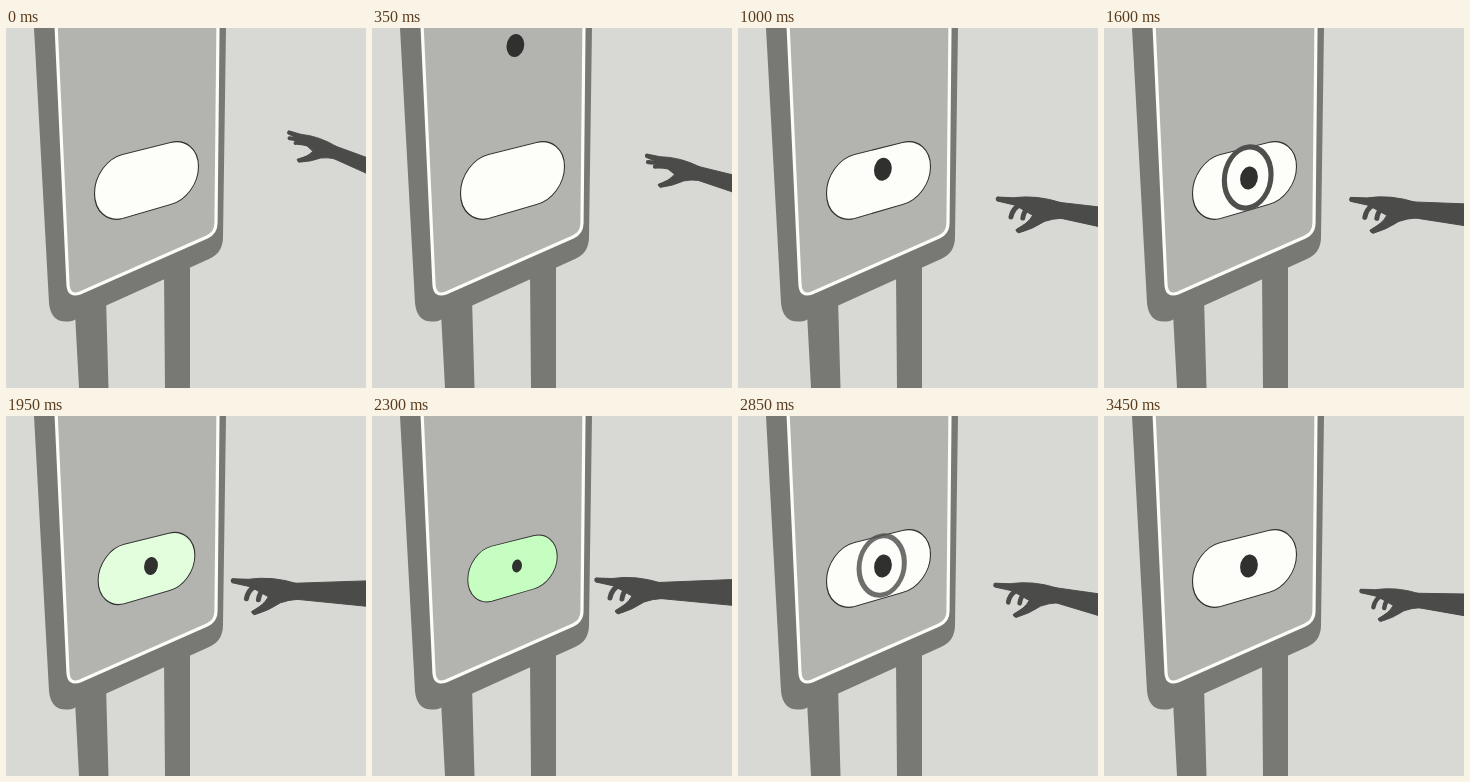
Write an HTML page that moves like this. It is 360 by 360 pixels and loops after 3600 ms.

```html
<!DOCTYPE html>
<html lang="en">
<head>
<meta charset="utf-8">
<title>Press the button</title>
<style>
  html, body { margin: 0; width: 100%; height: 100%; overflow: hidden; background: #d8d9d4; }
  svg { display: block; width: 100vw; height: 100vh; }
</style>
</head>
<body>
<svg viewBox="0 0 360 360">
  <g fill="#787974">
    <path d="M69 285L100 270L102.5 360H73Z M158 245L184 230V360H159Z"/>
    <path d="M28 0L43 275Q45 297 66 293L203 231Q217 225 217 209L220 0Z"/>
  </g>
  <path d="M50 -4L62 257Q63 269 74 265L201 209Q210 205 210 195L212 -4Z"
        fill="#b3b4b0" stroke="#fcfdf8" stroke-width="3.2"/>
  <path id="button" d="M-24 -32H24A28 31 0 0 1 24 30L-24 32A28 32 0 0 1 -24 -32Z"
        stroke="#30312f" stroke-width="1.1"/>
  <ellipse id="ring" rx="22.7" ry="29.6" fill="none" stroke="#4f504d" stroke-width="5"/>
  <ellipse id="dot" rx="8.9" ry="11.4" fill="#30312f"/>
  <g fill="#4b4b49" stroke="#4b4b49" stroke-linecap="round" stroke-linejoin="round">
    <path id="arm" stroke-width="1"/>
    <g id="hand">
      <path stroke-width="1" d="M2 -2L18 -1.5Q42 -5 67 3L68 18.5Q58 19 50 22Q38 30 24 34L21 31Q33 25 38 16L20 6L2 2Z"/>
      <path fill="none" stroke-width="4.5" d="M2.5 0L18 1.5M23.5 31.5L40 21"/>
      <path id="fingers" fill="none" stroke-width="5"/>
    </g>
  </g>
</svg>
<script>
const LOOP = 3600, STEP = 50, LAST = 3450;
const $ = id => document.getElementById(id);
const set = (id, attrs) => {
  for (const k in attrs) $(id).setAttribute(k, attrs[k]);
};

const span = (t, a, b) => Math.min(1, Math.max(0, (t - a) / (b - a)));
const sine = p => (1 - Math.cos(Math.PI * p)) / 2;
const cubic = p => p < 0.5 ? 4 * p ** 3 : 1 - 4 * (1 - p) ** 3;
const mix = (a, b, p) => a + (b - a) * p;

function drawHand(t) {
  const rise = span(t, 0, 1060);
  const press = cubic(span(t, 1100, 2250));
  const back = sine(span(t, 2300, 2850));
  const settle = sine(span(t, 2300, 3450));
  // Follow the four stops: start, raised, pressed, withdrawn
  const via = (a, b, c, d, end) => mix(mix(mix(a, b, rise), c, press), d, end);

  const x = via(281, 256, 222, 255, back);
  const y = via(104, 175, 164, 175, settle);
  const turn = mix(14, 0, rise);
  const size = via(0.78, 1, 1, 0.9, settle);
  set("hand", { transform: `translate(${x} ${y}) rotate(${turn}) scale(${size})` });

  const curl = sine(span(t, 400, 1000));
  const finger = (px, py, straight, bent) => {
    const tx = mix(straight[0], bent[0], curl), ty = mix(straight[1], bent[1], curl);
    return `M${px} ${py}Q${mix(px, tx, 0.8)} ${mix(py, ty, 0.3)} ${tx} ${ty}`;
  };
  set("fingers", { d: finger(24, 6, [5, 7], [16, 18]) + finger(33, 9, [14, 11], [28, 19]) });

  const a = turn * Math.PI / 180, c = Math.cos(a) * size, s = Math.sin(a) * size;
  const wrist = (px, py) => `${x + px * c - py * s} ${y + px * s + py * c}`;
  const armY = via(138, 192, 176.5, 189, back);
  const half = via(8, 10, 13, 11, back);
  set("arm", { d: `M${wrist(64, 2.5)}L362 ${armY - half}V${armY + half}L${wrist(66, 18.5)}Z` });
}

const place = (x, y, s, skew) => `matrix(${s} ${-skew * s} 0 ${s} ${x} ${y})`;

function drawButton(t) {
  const press = cubic(span(t, 1700, 2200)) - cubic(span(t, 2300, 2750));
  const tint = [[253, 198], [254, 253], [250, 192]].map(([a, b]) => Math.round(mix(a, b, press)));
  set("button", { transform: place(140.5, 152.5, mix(1, 0.86, press), 0.25), fill: `rgb(${tint})` });

  const close = cubic(span(t, 1300, 2200)) - cubic(span(t, 2300, 3150));
  set("ring", {
    transform: place(143.7, 149.5, mix(1.19, 0.1, close), 0.13),
    opacity: span(t, 1150, 1600) - span(t, 2750, 3300)
  });

  const drop = sine(span(t, 30, 1170));
  set("dot", {
    transform: place(mix(143, 145, drop), mix(-12, 150, drop), mix(1, 0.56, press), 0.13)
  });
}

const start = performance.now();
function tick() {
  const now = performance.now() - start;
  const t = Math.min(LAST, Math.floor(now % LOOP / STEP) * STEP);
  drawHand(t);
  drawButton(t);
  requestAnimationFrame(tick);
}
tick();
</script>
</body>
</html>
```
